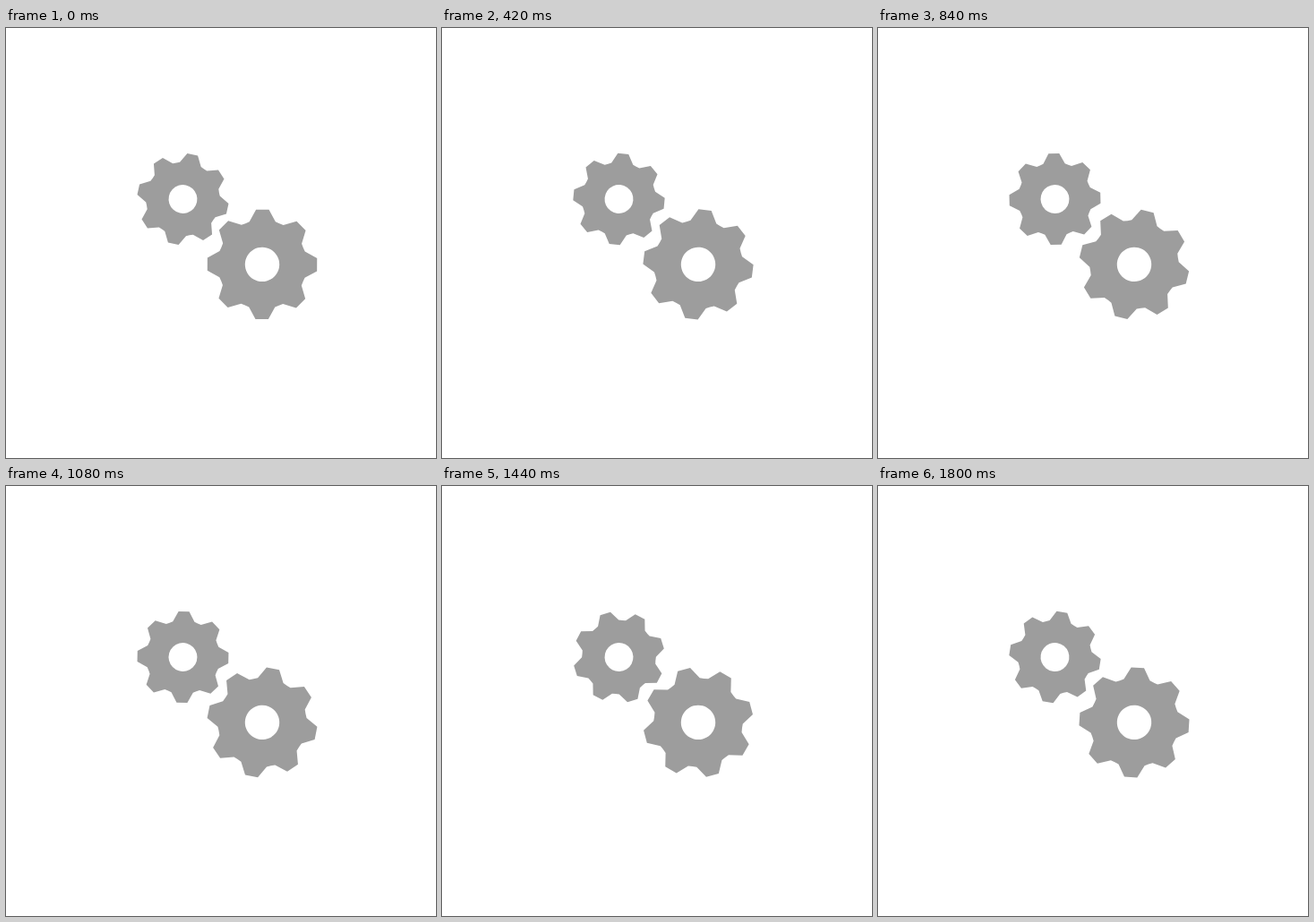
Write an HTML page that moves like this. It is 480 by 480 pixels and loops after 1.86 s.

```html
<!DOCTYPE html>
<html lang="en">
<head>
<meta charset="utf-8">
<title>Gears</title>
<style>
html, body { margin: 0; width: 100%; height: 100%; overflow: hidden; background: #fff; }
svg { display: block; width: 480px; height: 480px; }
path { fill: #9d9d9d; fill-rule: evenodd; }
</style>
</head>
<body>
<svg viewBox="0 0 480 480"><path id="small"/><path id="big"/></svg>
<script>
const LOOP = 1860, STEP = 60, TURN = 11.89; // ms, ms, degrees per step
const TEETH = 8, TIP = 61.6, ROOT = 49.8, HOLE = 19.2;

const polar = (r, deg) => {
  const a = deg * Math.PI / 180;
  return `${(r * Math.sin(a)).toFixed(2)} ${(-r * Math.cos(a)).toFixed(2)}`;
};

function gearPath() {
  let d = '';
  for (let i = 0; i < TEETH; i++) {
    const a = i * 360 / TEETH;
    d += `${i ? 'L' : 'M'}${polar(TIP, a - 6.7)}L${polar(TIP, a + 6.7)}L${polar(ROOT, a + 17)}`
       + `Q${polar(ROOT - 0.6, a + 22.5)} ${polar(ROOT, a + 28)}`;
  }
  return `${d}ZM0 ${-HOLE}a${HOLE} ${HOLE} 0 1 0 .01 0Z`;
}

const gears = [
  { id: 'small', x: 197.5, y: 191, scale: 0.831, start: 12.2, dir: 1 },
  { id: 'big', x: 286, y: 263.9, scale: 1, start: 0.3, dir: -1 }
];
const shape = gearPath();
for (const g of gears) {
  g.node = document.getElementById(g.id);
  g.node.setAttribute('d', shape);
}

function draw(now) {
  const step = Math.floor(now % LOOP / STEP);
  for (const g of gears) {
    const angle = g.start + g.dir * TURN * step;
    g.node.setAttribute('transform', `translate(${g.x} ${g.y}) rotate(${angle}) scale(${g.scale})`);
  }
}

let origin;
function tick(now) {
  origin ??= now;
  draw(now - origin);
  requestAnimationFrame(tick);
}
draw(0);
requestAnimationFrame(tick);
</script>
</body>
</html>
```
